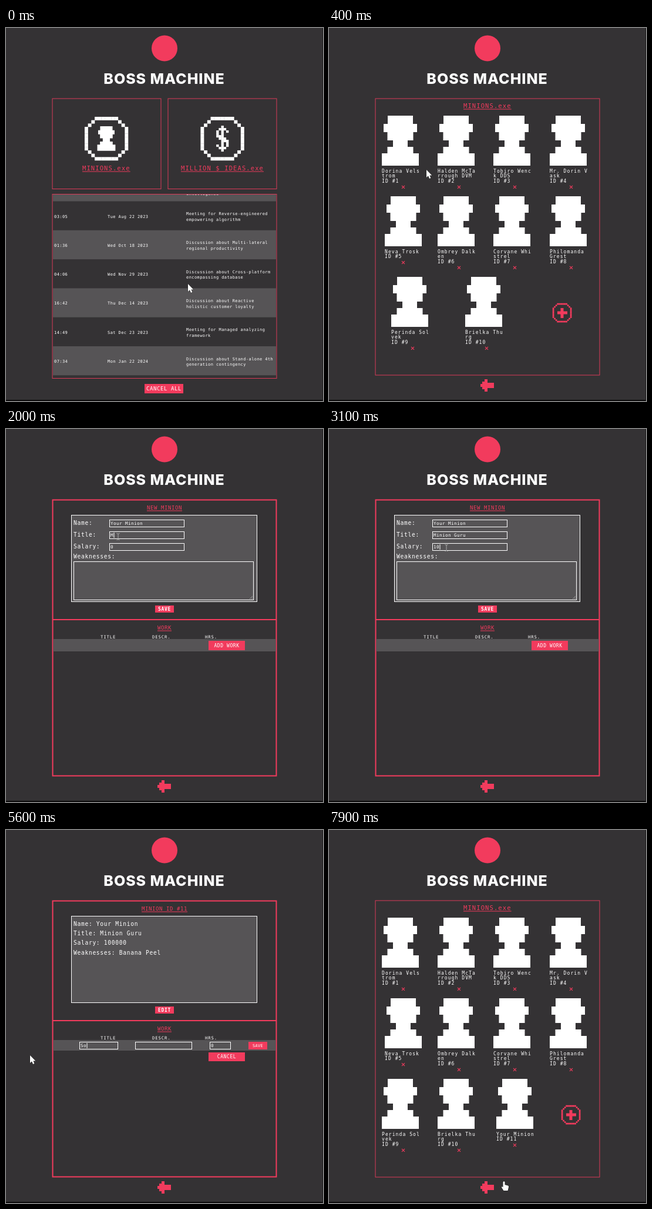
Write an HTML page with a canvas that moves like this. It is 540x634 px and loops after 8 s.

```html
<!DOCTYPE html>
<html lang="en">
<head>
<meta charset="utf-8">
<title>Boss Machine</title>
<style>
html, body { margin: 0; width: 100%; height: 100%; overflow: hidden; background: #343234; }
canvas { display: block; }
</style>
</head>
<body>
<canvas id="stage" width="540" height="634"></canvas>
<script>
const ctx = document.getElementById('stage').getContext('2d');
const LOOP = 8000, STEP = 100;
const BG = '#343234', PINK = '#f23b5d', THIN = '#d93a58', GREY = '#565456', WHITE = '#fff';

const rect = (x, y, w, h, color) => { ctx.fillStyle = color; ctx.fillRect(x, y, w, h); };

// Outline whose outer edge fills x..x+w, y..y+h
function frame(x, y, w, h, color, width = 1) {
  ctx.strokeStyle = color;
  ctx.lineWidth = width;
  ctx.strokeRect(x + width / 2, y + width / 2, w - width, h - width);
}

// Monospaced text; pitch is the advance of one character
function text(str, x, y, size, pitch, color = WHITE, weight = 400) {
  ctx.font = `${weight} ${size}px "DejaVu Sans Mono", "Noto Sans Mono", monospace`;
  ctx.letterSpacing = `${pitch - size * 0.602}px`;
  ctx.fillStyle = color;
  ctx.fillText(str, x, y);
}

function link(str, x, y, size, pitch) {
  text(str, x, y, size, pitch, PINK);
  rect(x, y + 1.5, str.length * pitch, 1, PINK);
}

function button(str, x, y, w, h, size, pitch, weight = 400) {
  rect(x, y, w, h, PINK);
  text(str, x + (w - str.length * pitch) / 2, y + h / 2 + size * 0.36, size, pitch, WHITE, weight);
}

function bust(x, y, s = 1) {
  const rows = [[10, 0, 43, 14], [3, 14, 57, 14], [9.5, 28, 44, 14],
    [19, 42, 25, 11], [9.5, 53, 44, 11], [0, 64, 63, 21]];
  ctx.fillStyle = WHITE;
  ctx.beginPath();
  for (const [dx, dy, w, h] of rows) ctx.rect(x + dx * s, y + dy * s, w * s, h * s);
  ctx.fill();
}

function octagon(cx, cy, cell, color) {
  for (let i = -6; i <= 6; i++) for (let j = -6; j <= 6; j++) {
    const a = Math.abs(i), b = Math.abs(j), max = Math.max(a, b);
    if ((max === 6 && a + b <= 9) || (max < 6 && a + b === 9))
      rect(cx + (i - 0.5) * cell, cy + (j - 0.5) * cell, cell + 0.2, cell + 0.2, color);
  }
}

function plus(x, y) {
  octagon(x, y, 2.5, PINK);
  rect(x - 8, y - 2.5, 17, 5, PINK);
  rect(x - 2.5, y - 8, 5, 17, PINK);
}

function dollar(x, y) {
  const rows = ['...#...', '..###..', '.#.#.#.', '.#.#...', '.###...', '..###..',
    '...###.', '...#.#.', '.#.#.#.', '..###..', '...#...'];
  rows.forEach((row, j) => [...row].forEach((c, i) => {
    if (c === '#') rect(x + i * 4.2, y + j * 4, 4.3, 4.1, WHITE);
  }));
}

function backArrow() {
  rect(258, 605, 4, 5, PINK);
  rect(261, 601, 5, 13, PINK);
  rect(265, 597, 5, 21, PINK);
  rect(270, 603, 11, 9, PINK);
}

function header() {
  rect(0, 0, 540, 634, BG);
  ctx.fillStyle = PINK;
  ctx.beginPath();
  ctx.arc(270, 34.5, 22, 0, 7);
  ctx.fill();
  ctx.font = '800 25px Inter, sans-serif';
  ctx.letterSpacing = '0.95px';
  ctx.fillStyle = WHITE;
  ctx.textAlign = 'center';
  ctx.fillText('BOSS MACHINE', 269.5, 94.5);
  ctx.textAlign = 'left';
}

const meetings = [
  ['03:05', 'Tue Aug 22 2023', 'Meeting for Reverse-engineered', 'empowering algorithm'],
  ['01:36', 'Wed Oct 18 2023', 'Discussion about Multi-lateral', 'regional productivity'],
  ['04:06', 'Wed Nov 29 2023', 'Discussion about Cross-platform', 'encompassing database'],
  ['16:42', 'Thu Dec 14 2023', 'Discussion about Reactive', 'holistic customer loyalty'],
  ['14:49', 'Sat Dec 23 2023', 'Meeting for Managed analyzing', 'framework'],
  ['07:34', 'Mon Jan 22 2024', 'Discussion about Stand-alone 4th', 'generation contingency']
];

function home() {
  frame(78.5, 119.5, 186, 154.5, THIN);
  frame(275.5, 119.5, 186, 154.5, THIN);
  octagon(171, 188, 5.7, WHITE);
  octagon(368.5, 188, 5.7, WHITE);
  bust(155.5, 167, 0.49);
  dollar(354, 166);
  link('MINIONS.exe', 130, 242, 10.5, 7.42);
  link('MILLION $ IDEAS.exe', 298, 242, 10.5, 7.42);

  ctx.save();
  ctx.beginPath();
  ctx.rect(80, 283, 380, 312);
  ctx.clip();
  rect(80, 283, 380, 11.5, GREY);
  text('intelligence', 307, 284, 7, 4.63);
  meetings.forEach(([time, date, top, bottom], i) => {
    const y = 294.5 + i * 49.3;
    if (i % 2) rect(80, y, 380, 49.3, GREY);
    text(time, 82, y + 28, 7, 4.63);
    text(date, 173, y + 28, 7, 4.63);
    text(top, 307, y + 23.5, 7, 4.63);
    text(bottom, 307, y + 33.3, 7, 4.63);
  });
  ctx.restore();
  frame(78.5, 282, 383, 314, THIN);
  button('CANCEL ALL', 236, 605, 66, 16, 9, 6);
}

const names = ['Dorina Velstrom', 'Halden McTarrough DVM', 'Tobiro Wenck DDS', 'Mr. Dorin Vask',
  'Neva Trosk', 'Ombrey Dalken', 'Corvane Whistrel', 'Philomanda Grest',
  'Perinda Solvek', 'Brielka Thurg'];

function minion(name, id, x, y) {
  bust(x, y);
  const lines = [...name.match(/.{1,11}/g), 'ID #' + id];
  lines.forEach((line, i) => text(line.trim(), x, y + 96.5 + i * 8.5, 8, 5.9));
  // Wrapped names make a wider card, so its centre moves right
  const cx = x + (lines.length > 2 ? 36.5 : 31.5), cy = y + 95.5 + lines.length * 8.6;
  ctx.strokeStyle = PINK;
  ctx.lineWidth = 1.2;
  ctx.beginPath();
  ctx.moveTo(cx - 2.5, cy - 2.5); ctx.lineTo(cx + 2.5, cy + 2.5);
  ctx.moveTo(cx + 2.5, cy - 2.5); ctx.lineTo(cx - 2.5, cy + 2.5);
  ctx.stroke();
}

function minions(saved) {
  frame(78.5, 119.5, 383, 471, THIN);
  link('MINIONS.exe', 229, 136, 10.5, 7.42);
  const list = saved ? [...names, 'Your Minion'] : names;
  const columns = [[90, 185, 280, 376], [95, 185, 280, 376], saved ? [90, 185, 285] : [106, 232]];
  list.forEach((name, i) => {
    const row = i >> 2;
    minion(name, i + 1, columns[row][i % 4], 149 + row * 137);
  });
  plus(saved ? 412 : 397, 484);
  backArrow();
}

// Part of a string typed by time t, and a text field showing it
const typed = (str, t, start, pace) => t < start ? '' : str.slice(0, Math.floor((t - start) / pace) + 1);

function field(x, y, w, h, value, focus, baseline = y + 9) {
  frame(x, y, w, h, WHITE);
  text(value, x + 2, baseline, 7.6, 5);
  if (focus) rect(x + 2.5 + value.length * 5, baseline - 7, 1, 9, WHITE);
}

function panel(title, x) {
  frame(78.5, 119.5, 383, 471, PINK, 2);
  rect(80, 323, 380, 2, PINK);
  link(title, x, 137, 9, 6);
  rect(111, 146, 317, 148, GREY);
  frame(111, 146, 317, 148, WHITE);
  link('WORK', 258, 341, 9, 6);
  text('TITLE', 161, 355.5, 7.3, 5.25);
  text('DESCR.', 249, 355.5, 7.3, 5.25);
  text('HRS.', 339, 355.5, 7.3, 5.25);
  backArrow();
}

const label = (str, y) => text(str, 115, y, 9.6, 6.48);

function addWorkRow() {
  rect(80.5, 357, 379, 21, GREY);
  button('ADD WORK', 345, 360, 62, 16, 8, 5.4);
}

function newMinion(t) {
  panel('NEW MINION', 240);
  label('Name:', 163);
  label('Title:', 183);
  label('Salary:', 203);
  label('Weaknesses:', 220);
  field(176, 154, 128, 13, typed('Your Minion', t, 1250, 50), t >= 1200 && t < 1900);
  field(176, 174, 128, 13, typed('Minion Guru', t, 1950, 70), t >= 1900 && t < 2800);
  field(176, 194, 128, 13, typed('100000', t, 3000, 100) || '0', t >= 2800 && t < 3900);
  const focus = t >= 3900;
  if (focus) {
    ctx.beginPath();
    ctx.roundRect(114, 224.5, 309, 67, 3);
    ctx.strokeStyle = WHITE; ctx.lineWidth = 1; ctx.stroke();
    frame(115, 225, 307, 66, '#111', 2);
  } else {
    frame(115, 225, 307, 66, WHITE);
  }
  const value = typed('Banana Peel', t, 4150, 60);
  text(value, 117, 234, 7.6, 5);
  if (focus) rect(117.5 + value.length * 5, 227, 1, 9, WHITE);
  ctx.strokeStyle = '#bbb';
  ctx.lineWidth = 0.7;
  ctx.beginPath();
  ctx.moveTo(415, 289); ctx.lineTo(420, 284);
  ctx.moveTo(418, 289); ctx.lineTo(420, 287);
  ctx.stroke();
  button('SAVE', 254, 300, 32, 12, 8, 5.5, 700);
  addWorkRow();
}

function savedMinion(t) {
  panel('MINION ID #11', 231);
  ['Name: Your Minion', 'Title: Minion Guru', 'Salary: 100000', 'Weaknesses: Banana Peel']
    .forEach((line, i) => label(line, 163 + i * 16.2));
  button('EDIT', 254, 300, 32, 12, 8, 5.5, 700);
  if (t < 5200) return addWorkRow();
  rect(80.5, 357, 379, 18, GREY);
  if (t < 7500) {
    field(125, 360, 66, 13, typed('Some Work', t, 5480, 75), t >= 5300 && t < 6300);
    field(220, 360, 97, 13, typed('I love Work!!', t, 6350, 50), t >= 6300 && t < 7100);
    field(347, 360, 36, 13, typed('20', t, 7100, 100) || '0', t >= 7100 && t < 7400);
    button('SAVE', 413, 360, 32, 13, 7, 4.5);
    button('CANCEL', 345, 378, 62, 15, 8, 5.4);
  } else {
    text('Some Work', 127, 369, 7.6, 5);
    text('I love Work!!', 222, 369, 7.6, 5);
    text('20', 349, 369, 7.6, 5);
    button('ADD WORK', 345, 378, 62, 15, 8, 5.4);
  }
}

// Pointer path: time, x, y, shape
const path = [
  [0, 310, 435, 'arrow'], [200, 175, 230, 'hand'], [300, 165, 238, 'arrow'], [400, 166, 241, 'arrow'],
  [500, 215, 320, 'arrow'], [700, 394, 478, 'hand'], [900, 396, 479, 'arrow'], [1000, 396, 479, 'arrow'],
  [1200, 210, 161, 'beam'], [1800, 210, 161, 'beam'], [1900, 191, 183, 'beam'], [2700, 191, 183, 'beam'],
  [2800, 200, 202, 'beam'], [3700, 200, 202, 'beam'], [3900, 204, 238, 'beam'], [4700, 204, 238, 'beam'],
  [4900, 268, 306, 'hand'], [5100, 374, 367, 'hand'], [5300, 150, 367, 'beam'], [5500, 41, 383, 'arrow'],
  [6100, 41, 383, 'arrow'], [6300, 250, 367, 'beam'], [7000, 250, 367, 'beam'], [7100, 360, 367, 'beam'],
  [7200, 360, 367, 'beam'], [7300, 405, 359, 'arrow'], [7400, 405, 359, 'arrow'], [7500, 420, 363, 'hand'],
  [7700, 270, 602, 'hand'], [7800, 276, 600, 'hand'], [7900, 298, 597, 'hand'], [8000, 298, 597, 'hand']
];

const shapes = {
  arrow: new Path2D('M0 0V13L3 10.3L5 15L7.4 14L5.4 9.5H9.3Z'),
  hand: new Path2D('M-1.5 1.5Q0 -1 1.5 1.5V6L7 7.5Q8.5 8 8 10L6.5 16H-.5L-4 10.5Q-4 8.5 -1.5 10Z'),
  beam: new Path2D('M-2.5 -5.5Q0 -5.5 0 -4V4Q0 5.5 -2.5 5.5M2.5 -5.5Q0 -5.5 0 -4M0 4Q0 5.5 2.5 5.5')
};

function pointer(t) {
  const i = path.findIndex(p => p[0] > t) - 1;
  const [t0, x0, y0, shape] = path[i], [t1, x1, y1] = path[i + 1];
  const k = (t - t0) / (t1 - t0);
  ctx.save();
  ctx.translate(x0 + (x1 - x0) * k, y0 + (y1 - y0) * k);
  ctx.lineWidth = 1;
  ctx.strokeStyle = shape === 'beam' ? '#aaa' : '#222';
  ctx.stroke(shapes[shape]);
  if (shape !== 'beam') { ctx.fillStyle = WHITE; ctx.fill(shapes[shape]); }
  ctx.restore();
}

function draw(now) {
  const t = Math.floor(now % LOOP / STEP) * STEP;
  header();
  if (t < 300) home();
  else if (t < 900) minions(false);
  else if (t < 4900) newMinion(t);
  else if (t < 7800) savedMinion(t);
  else minions(true);
  rect(0, 632, 540, 2, '#0c0b0c');
  rect(539, 0, 1, 634, '#1c1b1c');
  pointer(t);
}

const start = performance.now();
function tick() {
  draw(performance.now() - start);
  requestAnimationFrame(tick);
}
tick();
</script>
</body>
</html>
```
